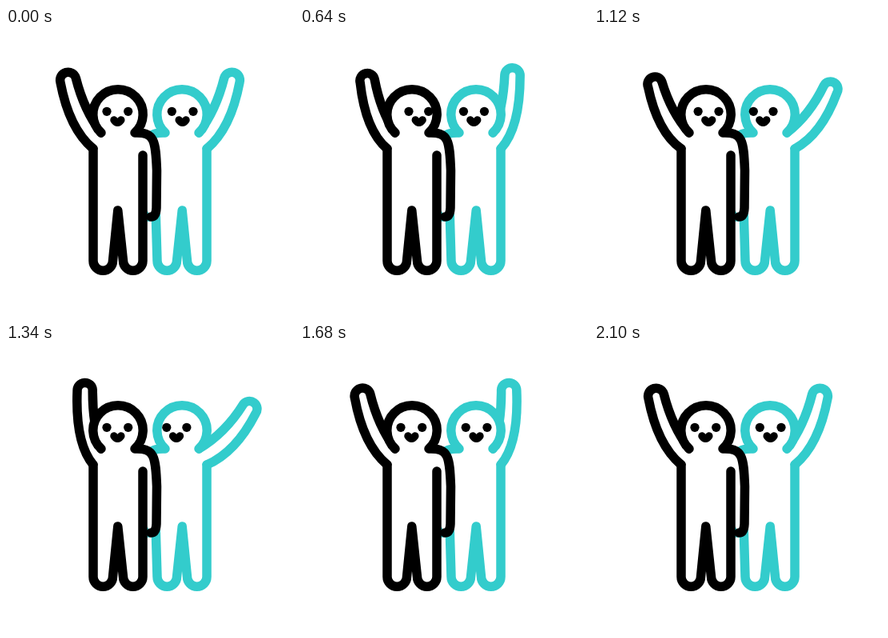
These frames come from a looping animation (360x360 px, 2400 ms). An HTML page:

```html
<!DOCTYPE html>
<html lang="en">
<head>
<meta charset="utf-8">
<title>Waving friends</title>
<style>
html, body { margin: 0; height: 100%; overflow: hidden; background: #fff; }
svg { display: block; width: 100vw; height: 100vh; }
.line { fill: #fff; stroke-width: 11.5; stroke-linecap: round; stroke-linejoin: round; }
</style>
</head>
<body>
<svg viewBox="0 0 360 360"></svg>
<script>
const LOOP = 2400;
const LEG = "a12.25 12.25 0 0 1-24.5 0";
const BODY = `L171 291${LEG}L139.8 228L133.5 291${LEG}V151`;
const HEAD = "M119 131A31.2 31.2 0 1 1 161 131C186 130 187 141 188.5 178L188 225Q187.5 236 181 236";

// Arm poses: outer tip, outer bend, inner tip, inner bend
const REST = [68, 68, 79, 126, 87.3, 62.5, 97.5, 103];
const UP = [89.2, 58.5, 86.5, 124, 108.4, 57.5, 108, 99.5];
const OUT = [45.5, 88.5, 72, 136, 60.8, 76.5, 84.7, 112.3];

// Moves: start, end, from, to
const ARM_MOVES = [
  [0, 400, REST, UP],
  [480, 900, UP, OUT],
  [920, 1320, OUT, UP],
  [1320, 1720, UP, REST]
];
const FACE_MOVES = [
  [90, 560, [0], [1]],
  [835, 1350, [1], [0]]
];

function poseAt(moves, t) {
  const [start, end, from, to] = moves.findLast(m => t >= m[0]) || moves[0];
  const p = Math.min(1, Math.max(0, (t - start) / (end - start)));
  const k = (1 - Math.cos(Math.PI * p)) / 2;
  return from.map((v, i) => v + (to[i] - v) * k);
}

const svg = document.querySelector("svg");

function makeFigure(color, delay, sideX, transform) {
  svg.insertAdjacentHTML("beforeend", `<g transform="${transform}">
    <g class="line" stroke="${color}">
      <path class="arm"/><path d="${HEAD}"/><path d="M${sideX} 159${BODY}"/>
    </g>
    <circle cy="104.3" r="5.6"/><circle cy="104.3" r="5.6"/>
    <path class="mouth" d="M135 115q4.4 6.4 8.8 0" fill="none" stroke="#000"
      stroke-width="9.5" stroke-linecap="round" stroke-linejoin="round"/>
  </g>`);
  const g = svg.lastElementChild;
  const arm = g.querySelector(".arm");
  const mouth = g.querySelector(".mouth");
  const [eyeA, eyeB] = g.querySelectorAll("circle");

  return time => {
    const t = time - delay;
    const [ox, oy, obx, oby, ix, iy, ibx, iby] = poseAt(ARM_MOVES, t);
    // The tiny radius is scaled up by SVG into an exact half circle
    arm.setAttribute("d",
      `M109 151Q${obx} ${oby} ${ox} ${oy}A1 1 0 0 1 ${ix} ${iy}Q${ibx} ${iby} 119 131`);
    const [turn] = poseAt(FACE_MOVES, t);
    eyeA.setAttribute("cx", 126 + 10 * turn);
    eyeB.setAttribute("cx", 152.7 + 8 * turn);
    mouth.setAttribute("transform", `translate(${9.3 * turn} 0)`);
  };
}

const figures = [
  makeFigure("#33cccc", 360, 175, "translate(360) scale(-1 1)"),
  makeFigure("#000", 0, 171, "")
];

const begin = performance.now();
function draw() {
  const time = (performance.now() - begin) % LOOP;
  figures.forEach(update => update(time));
  requestAnimationFrame(draw);
}
draw();
</script>
</body>
</html>
```
